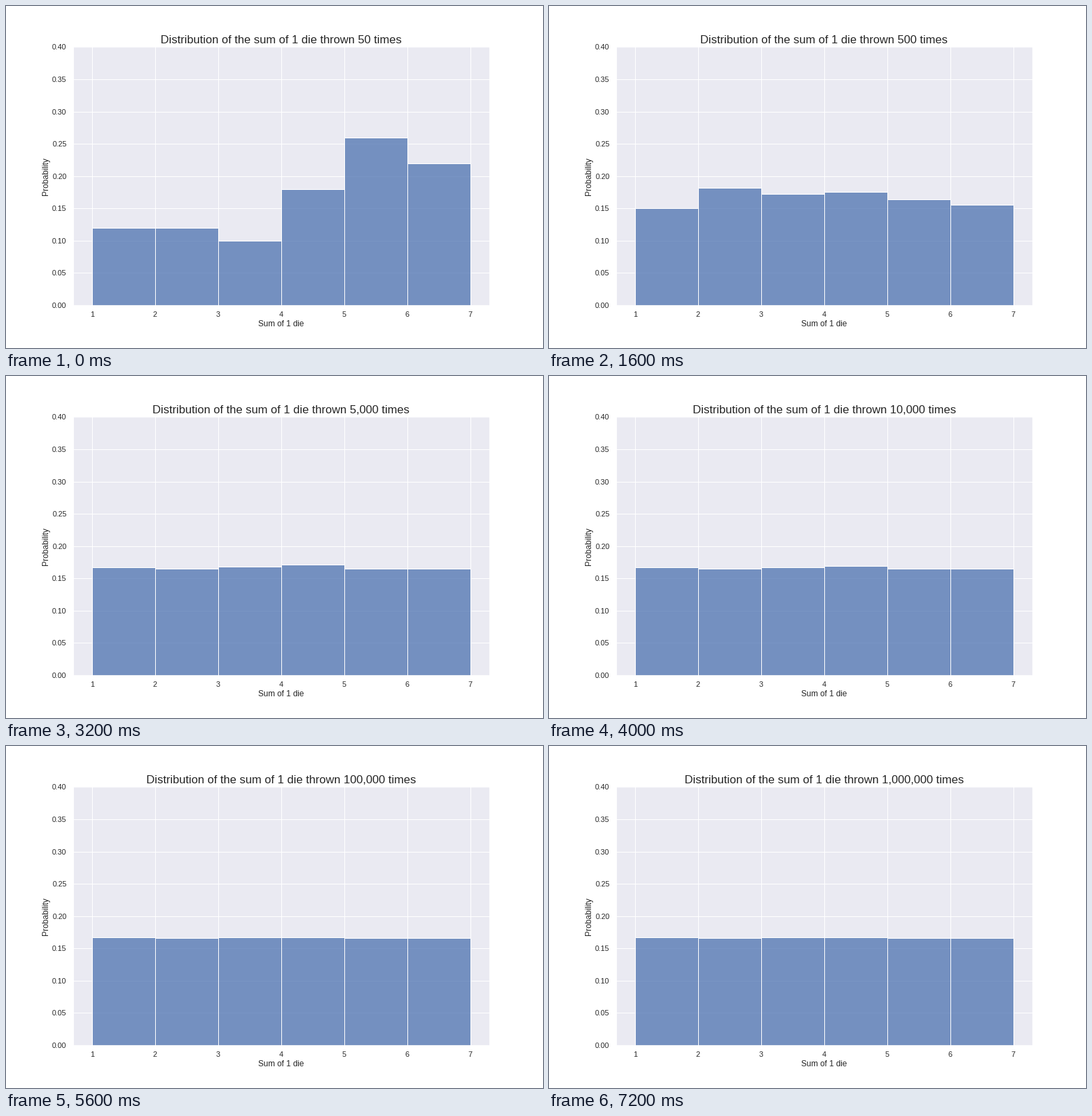
Write a matplotlib script that moves like this. It is 792x504 px and loops after 8000 ms.

```python
import matplotlib.pyplot as plt
import numpy as np
from matplotlib.animation import FuncAnimation

INK = "0.15"
STEP_MS = 800
FACES = np.arange(1, 7)

# face counts of the short experiments; the long ones settle towards 1/6
SHORT_RUNS = [
    (6, 6, 5, 9, 13, 11),
    (20, 13, 25, 15, 14, 13),
    (75, 91, 86, 88, 82, 78),
    (173, 192, 160, 166, 151, 158),
]
LONG_RUNS = [k * 10**p for p in (3, 4, 5) for k in (5, 10)]
SPREAD = 0.26

noise = np.random.RandomState(42).randn(6)
noise -= noise.mean()


def experiment(i):
    """Number of throws and share of each face in step i."""
    if i < len(SHORT_RUNS):
        counts = np.array(SHORT_RUNS[i])
        return counts.sum(), counts / counts.sum()
    throws = LONG_RUNS[i - len(SHORT_RUNS)]
    return throws, 1 / 6 + SPREAD * noise / np.sqrt(throws)


plt.rcParams.update({
    "font.family": "Liberation Sans",
    "text.color": INK,
    "axes.labelcolor": INK,
    "axes.facecolor": "#EAEAF2",
    "axes.edgecolor": "white",
    "axes.linewidth": 1.25,
    "axes.axisbelow": True,
    "axes.grid": True,
    "grid.color": "white",
    "grid.linewidth": 1,
    "lines.solid_capstyle": "round",
    "axes.labelsize": 12,
    "axes.labelpad": 3,
    "xtick.labelsize": 11,
    "ytick.labelsize": 11,
    "xtick.color": INK,
    "ytick.color": INK,
    "xtick.bottom": False,
    "ytick.left": False,
    "xtick.major.size": 6,
    "ytick.major.size": 6,
})

fig, ax = plt.subplots(figsize=(11, 7), dpi=72, facecolor="white")
fig.subplots_adjust(left=0.125, right=0.9, bottom=0.125, top=0.88)

bars = ax.bar(FACES, np.zeros(6), width=1, align="edge",
              facecolor=(76 / 255, 114 / 255, 176 / 255, 0.75),
              edgecolor="white", linewidth=1)
ax.set_xlim(0.7, 7.3)
ax.set_ylim(0, 0.4)
ax.set_xticks(range(1, 8))
ax.set_yticks(np.linspace(0, 0.4, 9))
ax.yaxis.set_major_formatter("{x:.2f}")
ax.set_xlabel("Sum of 1 die")
ax.set_ylabel("Probability")
title = ax.set_title("", fontsize=17, pad=5.9)


def draw(i):
    throws, shares = experiment(i)
    for bar, share in zip(bars, shares):
        bar.set_height(share)
    title.set_text(f"Distribution of the sum of 1 die thrown {throws:,} times")
    return [*bars, title]


anim = FuncAnimation(fig, draw, frames=len(SHORT_RUNS) + len(LONG_RUNS),
                     init_func=lambda: draw(0), interval=STEP_MS,
                     repeat=True, repeat_delay=0)
plt.show()
```
